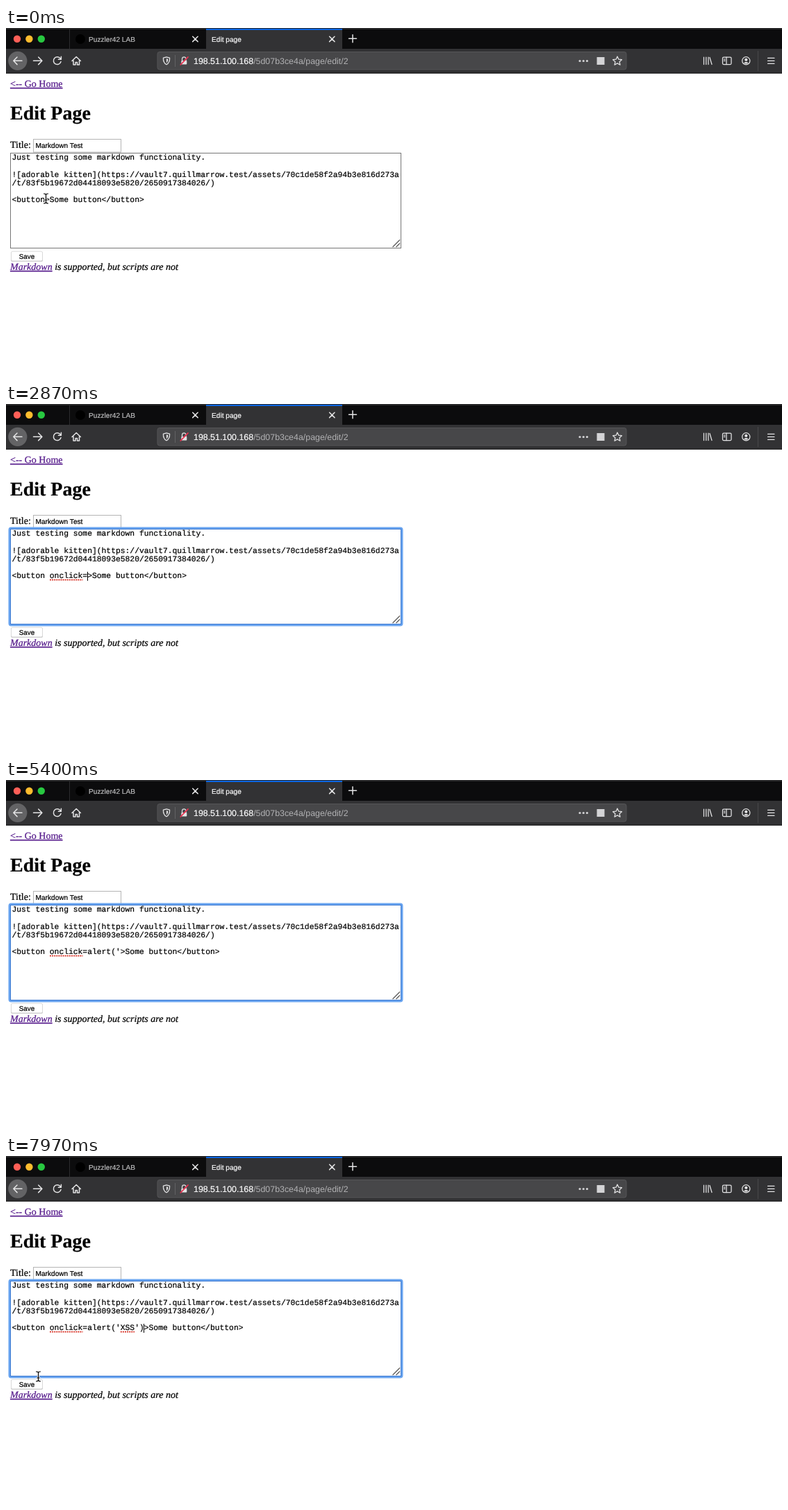
An HTML page that plays this animation: 1117x502 px, repeating every 8 s.

```html
<!DOCTYPE html>
<html lang="en">
<head>
<meta charset="utf-8">
<title>Edit page</title>
<style>
  html, body { margin: 0; width: 100%; height: 100%; overflow: hidden; background: #fff; }
  svg { display: block; position: absolute; left: 0; top: 0; }
  text { text-rendering: geometricPrecision; white-space: pre; fill: currentColor; stroke: currentColor; stroke-width: .22px; }
  .ui { font-family: "Liberation Sans", Arial, sans-serif; font-size: 10.15px; }
  .page { font-family: "Liberation Serif", Times, serif; font-size: 14px; }
  .code { font-family: "Liberation Mono", Courier, monospace; font-size: 11.333px; }
  .url { font-size: 12.4px; color: #f9f9fa; }
  .path { fill: #b1b1b3; stroke: none; }
  .link { fill: #551a8b; stroke: #551a8b; text-decoration: underline; }
  .icon { fill: none; stroke: #e4e4e5; stroke-width: 1.5; stroke-linecap: round; stroke-linejoin: round; }
  .thin { stroke-width: 1.25; }
  .solid { fill: #e4e4e5; stroke: none; }
  .spell { stroke: #d5281c; stroke-width: 1.6; stroke-dasharray: 2 1.1; }
</style>
</head>
<body>
<svg width="1117" height="502" viewBox="0 0 1117 502">
  <!-- tab strip -->
  <rect width="1117" height="30" fill="#0c0c0d"/>
  <rect y=".5" width="1117" height="1" fill="#4a4a4c"/>
  <circle cx="16" cy="15.8" r="5.2" fill="#ff5f57"/>
  <circle cx="33.4" cy="15.8" r="5.2" fill="#febc2e"/>
  <circle cx="50.8" cy="15.8" r="5.2" fill="#28c840"/>
  <path d="M91.5 2V30" stroke="#2c2c2e"/>
  <circle cx="107" cy="16" r="7" fill="#000"/>
  <text class="ui" x="119" y="19.5" color="#b9b9ba">Puzzler42 LAB</text>
  <rect x="288" y="1" width="196" height="29" fill="#323234"/>
  <rect x="288" y="1" width="196" height="2" fill="#0a66e4"/>
  <text class="ui" x="296" y="19.5" color="#f9f9fa">Edit page</text>
  <g class="icon">
    <path d="M268.7 12.2l7.4 7.4m0-7.4l-7.4 7.4M465.6 12.2l7.4 7.4m0-7.4l-7.4 7.4"/>
    <path d="M493.5 15.3h11M499 9.8v11"/>
  </g>

  <!-- toolbar -->
  <rect y="30" width="1117" height="35.5" fill="#323234"/>
  <rect y="64.5" width="1117" height="1" fill="#101011"/>
  <circle cx="16.8" cy="47.3" r="13.6" fill="#636365"/>
  <g class="icon">
    <path d="M23 47.3H11M16 42l-5.2 5.3 5.2 5.3"/>
    <path d="M39.5 47.3h12M46.7 42l5.2 5.3-5.2 5.3"/>
    <path d="M78.3 44.2A5.4 5.4 0 1 0 79 48.5M79.4 41.3v4h-4"/>
    <path d="M95 47.5l6.2-6 6.2 6M97 47v6h3v-3.5h2.5V53h3v-6"/>
  </g>
  <rect x="218" y="34.5" width="675" height="25.5" rx="3" fill="#474749" stroke="#555557"/>
  <path d="M243.5 39V56" stroke="#626264"/>
  <g class="icon thin">
    <path d="M231 41.8l4.6 1.4c.2 4-.8 7.4-4.6 9.6-3.8-2.2-4.8-5.6-4.6-9.6z"/>
    <path class="solid" d="M231 44v6.3c1.6-1.4 2.2-3.2 2.2-5.4z"/>
    <path d="M253.5 47v-2.3a2.8 2.8 0 0 1 5.6 0V47"/>
    <rect class="solid" x="252.3" y="47" width="8" height="5.5" rx="1"/>
    <path d="M251.2 53L262 41.8" stroke="#e8304f" stroke-width="1.7"/>
  </g>
  <text class="ui url" x="270" y="52">198.51.100.168<tspan class="path">/5d07b3ce4a/page/edit/2</tspan></text>
  <g fill="#d4d4d6">
    <circle cx="826" cy="47.5" r="1.6"/>
    <circle cx="831.2" cy="47.5" r="1.6"/>
    <circle cx="836.4" cy="47.5" r="1.6"/>
    <rect x="850.5" y="42" width="11" height="11"/>
  </g>
  <g class="icon thin">
    <path d="M880 41l1.9 4.2 4.5.5-3.4 3 1 4.5-4-2.3-4 2.3 1-4.5-3.4-3 4.5-.5z"/>
    <path d="M1004.5 42v10.5M1007.8 42v10.5M1011 42v10.5M1013 42.5l3 10"/>
    <rect x="1031.5" y="42" width="12.5" height="10.5" rx="1.5"/>
    <path d="M1037 42v10.5M1033.5 45h1.5M1033.5 47.3h1.5"/>
    <circle cx="1065.3" cy="47.3" r="5.6"/>
    <circle class="solid" cx="1065.3" cy="45.8" r="2.1"/>
    <path class="solid" d="M1062 50.4q3.3-2.8 6.6 0l-3.3 1.4z"/>
    <path d="M1096.5 43.3h9.5M1096.5 47.3h9.5M1096.5 51.3h9.5"/>
  </g>
  <path d="M1082.5 33V62" stroke="#48484a"/>

  <!-- page -->
  <text class="page link" x="6" y="85">&lt;-- Go Home</text>
  <text class="page" x="6" y="132" style="font-size:28px;font-weight:bold">Edit Page</text>
  <text class="page" x="6" y="173">Title:</text>
  <rect x="39.5" y="160.5" width="126" height="18.5" fill="#fff" stroke="#b4b4b4"/>
  <text class="ui" x="42.5" y="173.3">Markdown Test</text>

  <rect id="ring" x="5" y="179" width="565" height="140" rx="2.5" fill="none" stroke="#6aa5f0" stroke-width="3"/>
  <rect id="box" x="6.5" y="180.5" width="562" height="137" fill="#fff"/>
  <path d="M556.5 316l10.5-10.5M561.5 316l5.5-5.5" stroke="#555" stroke-width="1.1"/>
  <text class="code" x="8.4" y="190">Just testing some markdown functionality.</text>
  <text class="code" x="8.4" y="214.5">![adorable kitten](https://vault7.quillmarrow.test/assets/70c1de58f2a94b3e816d273a</text>
  <text class="code" x="8.4" y="226.7">/t/83f5b19672d04418093e5820/2650917384026/)</text>
  <text class="code" x="8.4" y="251.2">&lt;button<tspan id="typed"></tspan>&gt;Some button&lt;/button&gt;</text>
  <path id="spellA" class="spell" d="M63 253.6H110.5"/>
  <path id="spellB" class="spell" d="M164.8 253.6H185"/>
  <rect id="caret" y="242" width="1" height="13"/>

  <rect x="7" y="322.5" width="46" height="14.5" rx="2" fill="#c4c4c4"/>
  <rect x="7.5" y="322.3" width="45" height="13.7" rx="2" fill="#fff" stroke="#d6d6d6" stroke-width=".8"/>
  <text class="ui" x="30" y="332.6" text-anchor="middle" style="font-size:9.8px">Save</text>
  <text class="page" x="6" y="349" font-style="italic"><tspan class="link">Markdown</tspan> is supported, but scripts are not</text>

  <defs>
    <path id="beam" d="M-3-7Q0-7 0-5Q0-7 3-7M0-5V5M-3 7Q0 7 0 5Q0 7 3 7M-1.8 2H1.8"/>
  </defs>
  <g id="mouse" fill="none" stroke-linecap="round">
    <use href="#beam" stroke="#fff" stroke-width="2.6"/>
    <use href="#beam" stroke="#000" stroke-width="1.2"/>
  </g>
</svg>
<script>
  const LOOP = 8000, LEFT = 8.4, CHAR = 6.8, FOCUS = 30;
  const $ = id => document.getElementById(id);
  const [ring, box, typed, caret, mouse, spellA, spellB] =
    ["ring", "box", "typed", "caret", "mouse", "spellA", "spellB"].map($);

  const insert = " onclick=alert('XSS')";
  // one key time per inserted character
  const keys = [870, 1730, 1800, 2000, 2050, 2100, 2140, 2190, 2850, 3130,
    4000, 4130, 4300, 4500, 4770, 4840, 5630, 5870, 6000, 6130, 6770];
  // spans in which the caret is blinked off
  const blinks = [[1430, 1730], [2570, 2850], [3700, 4000], [5400, 5630], [6560, 6770], [7270, 7830]];
  // pointer stops: time, x, y
  const stops = [[0, 57.5, 246], [470, 57.5, 246], [830, 58, 277.4], [1200, 58, 286],
    [7000, 58, 286], [7270, 57, 288], [7470, 57, 288], [7950, 46.5, 318], [LOOP, 46.5, 318]];

  const show = (el, on) => el.setAttribute("visibility", on ? "visible" : "hidden");
  const within = (t, [a, b]) => t >= a && t < b;

  function pointer(t) {
    const i = stops.findIndex(s => s[0] > t);
    const [a, b] = [stops[i - 1], stops[i]];
    const p = (t - a[0]) / (b[0] - a[0]);
    const e = p * p * (3 - 2 * p);
    return [a[1] + (b[1] - a[1]) * e, a[2] + (b[2] - a[2]) * e];
  }

  function draw(t) {
    const n = keys.filter(k => k <= t).length;
    const focused = t >= FOCUS;
    const text = insert.slice(0, n);
    if (typed.textContent !== text) typed.textContent = text;
    show(ring, focused);
    box.setAttribute("stroke", focused ? "#3a78d0" : "#767676");
    show(spellA, n >= 9);
    show(spellB, n >= 20);
    caret.setAttribute("x", Math.floor(LEFT + (7 + n) * CHAR + .05));
    show(caret, focused && !blinks.some(b => within(t, b)));
    show(mouse, !within(t, [1730, 7000]));
    mouse.setAttribute("transform", `translate(${pointer(t)})`);
  }

  const start = performance.now();
  function tick() {
    draw((performance.now() - start) % LOOP);
    requestAnimationFrame(tick);
  }
  tick();
</script>
</body>
</html>
```
